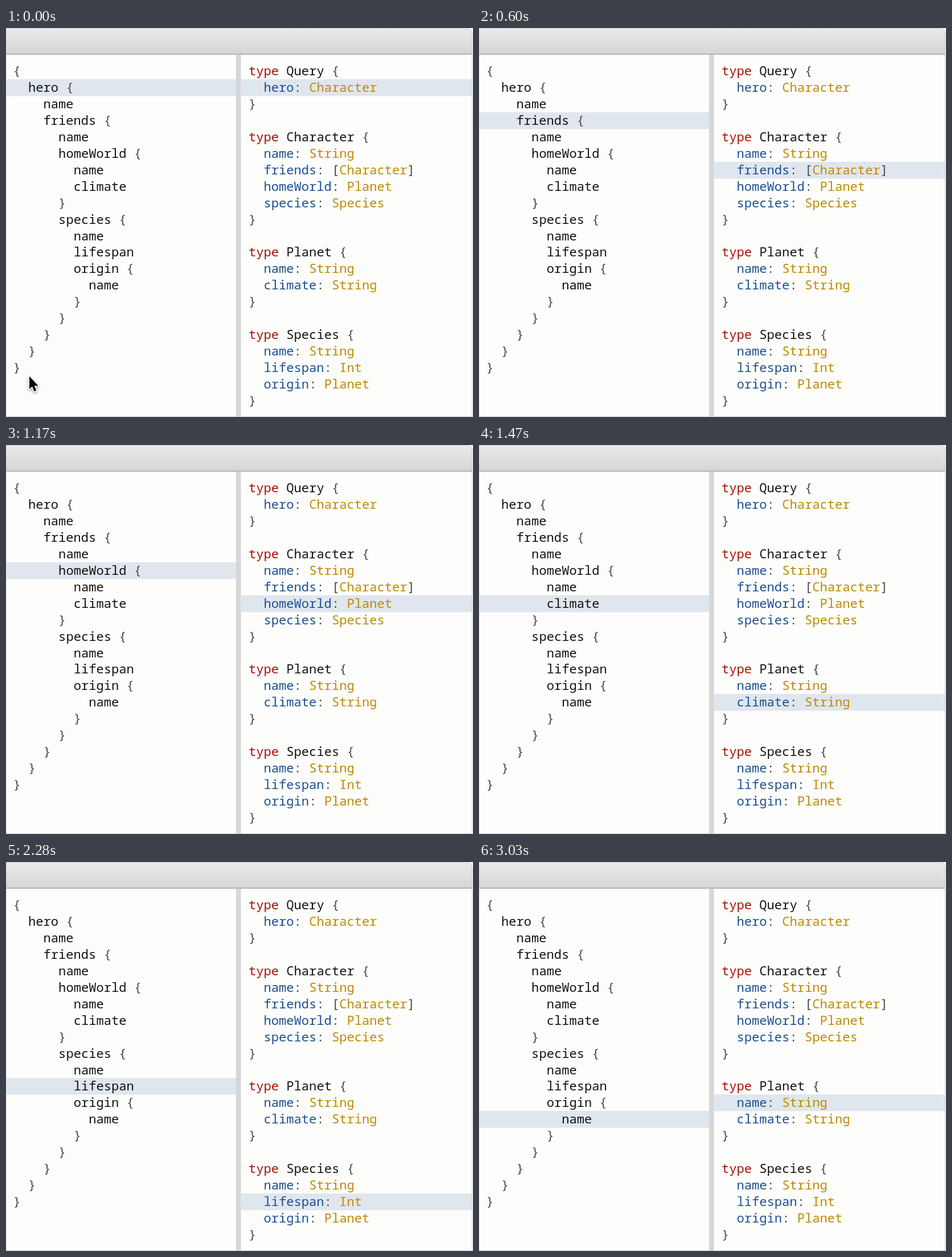
Write an HTML page with a canvas that moves like this. It is 820 px wide and 683 px high and loops after 3.06 s.

```html
<!DOCTYPE html>
<html lang="en">
<head>
<meta charset="utf-8">
<title>Query and schema</title>
<style>
  html, body { margin: 0; width: 100%; height: 100%; overflow: hidden; background: #fff; }
  canvas { display: block; }
</style>
</head>
<body>
<canvas id="stage" width="820" height="683"></canvas>
<script>
const ctx = document.getElementById('stage').getContext('2d');

const LOOP = 3060;
const STEP = 265;
const LEAD = 120;          // part of the first step already over at time 0
const CURSOR_GONE = 400;

const CHAR = 13.27;
const LINE = 28.95;
const COLORS = {
  plain: '#121212', mark: '#484848', keyword: '#a81007',
  field: '#1b5091', type: '#be8a04'
};

const query = `{
  hero {
    name
    friends {
      name
      homeWorld {
        name
        climate
      }
      species {
        name
        lifespan
        origin {
          name
        }
      }
    }
  }
}`.split('\n');

const schema = `type Query {
  hero: Character
}

type Character {
  name: String
  friends: [Character]
  homeWorld: Planet
  species: Species
}

type Planet {
  name: String
  climate: String
}

type Species {
  name: String
  lifespan: Int
  origin: Planet
}`.split('\n');

// [query line, schema line] selected at each step
const steps = [
  [1, 1], [2, 5], [3, 6], [4, 5], [5, 7], [6, 12],
  [7, 13], [9, 8], [10, 17], [11, 18], [12, 19], [13, 12]
];

function rect(x, y, w, h, color) {
  ctx.fillStyle = color;
  ctx.fillRect(x, y, w, h);
}

function tokenColor(word, line, col, isSchema) {
  if (/\W/.test(word)) return COLORS.mark;
  if (!isSchema) return COLORS.plain;
  if (line.startsWith('type')) return col ? COLORS.plain : COLORS.keyword;
  return col === 2 ? COLORS.field : COLORS.type;
}

function drawCode(lines, x, isSchema) {
  lines.forEach((line, row) => {
    for (const m of line.matchAll(/\w+|[^\w\s]/g)) {
      ctx.fillStyle = tokenColor(m[0], line, m.index, isSchema);
      ctx.fillText(m[0], x + m.index * CHAR, 83 + row * LINE);
    }
  });
}

function drawWindow() {
  rect(0, 0, 820, 683, '#fdfdfc');
  ctx.beginPath();
  ctx.moveTo(0, 0.5);
  ctx.lineTo(809, 0.5);
  ctx.quadraticCurveTo(818.5, 0.5, 818.5, 10);
  ctx.lineTo(818.5, 682.5);
  ctx.lineTo(0, 682.5);
  ctx.closePath();

  ctx.save();
  ctx.clip();
  const bar = ctx.createLinearGradient(0, 0, 0, 45);
  bar.addColorStop(0, '#ebebeb');
  bar.addColorStop(1, '#d5d5d5');
  rect(0, 0, 819, 46, bar);
  rect(0, 45.5, 819, 1, '#84847c');
  ctx.restore();

  ctx.strokeStyle = '#c9c9c7';
  ctx.lineWidth = 1;
  ctx.stroke();
  rect(404, 47, 8.5, 635, '#d6d6d6');
}

function drawSelection(x, w, row) {
  rect(x, Math.round(61 + row * LINE), w, 29.5, '#e0e6ee');
}

function drawCursor() {
  ctx.save();
  ctx.translate(41, 611.5);
  ctx.beginPath();
  [[0, 0], [0, 22.5], [5, 18], [8.5, 26.5], [12.3, 25], [8.8, 16.8], [15.8, 16.8]]
    .forEach(([x, y]) => ctx.lineTo(x, y));
  ctx.closePath();
  ctx.lineJoin = 'round';
  ctx.lineWidth = 3;
  ctx.strokeStyle = '#fff';
  ctx.shadowColor = 'rgba(0,0,0,.4)';
  ctx.shadowBlur = 4;
  ctx.shadowOffsetY = 2;
  ctx.stroke();
  ctx.shadowColor = 'transparent';
  ctx.fillStyle = '#080808';
  ctx.fill();
  ctx.restore();
}

function draw(t) {
  const i = Math.min(steps.length - 1, Math.floor((t + LEAD) / STEP));
  const [left, right] = steps[i];
  drawWindow();
  drawSelection(0, 404, left);
  drawSelection(413, 405, right);
  ctx.font = '500 22.1px "Roboto Mono", "Noto Sans Mono", "DejaVu Sans Mono", monospace';
  drawCode(query, 12.5, false);
  drawCode(schema, 426, true);
  if (t < CURSOR_GONE) drawCursor();
}

const start = performance.now();
function tick() {
  draw((performance.now() - start) % LOOP);
  requestAnimationFrame(tick);
}
tick();
</script>
</body>
</html>
```
